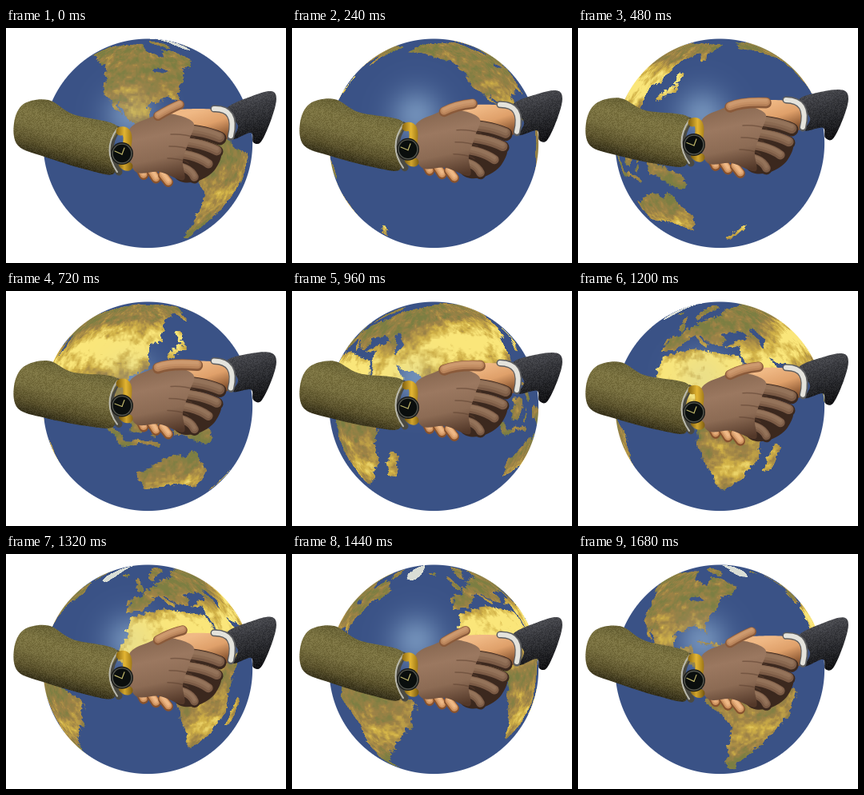
These frames come from a looping animation (350x294 px, 1.8 s). An HTML page with a canvas:

```html
<!DOCTYPE html>
<html lang="en">
<head>
<meta charset="utf-8">
<title>Handshake around the globe</title>
<style>
html, body { margin: 0; width: 100%; height: 100%; overflow: hidden; background: #fff; }
canvas { display: block; }
</style>
</head>
<body>
<canvas id="stage" width="350" height="294"></canvas>
<script>
const STEP = 120, STEPS = 15;
const TW = 720, TH = 360;
const CX = 177.3, CY = 144.3, R = 130.8;
const ctx = document.getElementById('stage').getContext('2d');
const rad = Math.PI / 180;
const clamp = (v, a = 0, b = 1) => Math.min(b, Math.max(a, v));
const mix = (a, b, t) => a + (b - a) * t;
const bell = (v, width) => Math.exp(-((v / width) ** 2));

function makeCanvas(w, h) {
  const c = document.createElement('canvas');
  c.width = w; c.height = h;
  return c.getContext('2d', { willReadFrequently: true });
}

function hash(x, y) {
  const v = Math.sin(x * 127.1 + y * 311.7) * 43758.5453;
  return v - Math.floor(v);
}
function noise(x, y) {
  const i = Math.floor(x), j = Math.floor(y);
  const u = x - i, v = y - j;
  return mix(mix(hash(i, j), hash(i + 1, j), u), mix(hash(i, j + 1), hash(i + 1, j + 1), u), v);
}

// Key points of each coast as longitude, latitude; noise makes them ragged
const continents = {
  northAmerica: [-167,62, -156,71, -95,70, -93,60, -80,53, -77,62, -65,59, -56,51, -70,43, -81,30, -80,25, -84,30,
    -97,27, -95,18, -88,21, -83,10, -79,8, -95,15, -106,21, -113,31, -110,23, -121,35, -124,48, -150,60],
  southAmerica: [-78,9, -61,10, -50,1, -35,-7, -39,-17, -48,-27, -58,-37, -66,-45, -68,-55, -75,-50, -71,-18, -81,-5],
  africa: [-8,35, 10,37, 33,31, 43,12, 51,11, 40,-5, 39,-16, 32,-28, 20,-35, 12,-16, 9,3, -8,5, -17,15],
  europe: [-12,37, -11,44, -2,48, 10,55, 28,60, 40,67, 62,69, 62,42, 45,42, 38,46, 30,45, 25,38, 21,38, 14,45, 6,44, -3,38],
  asia: [58,69, 105,77, 180,69, 162,60, 157,52, 153,60, 137,54, 128,40, 121,39, 121,29, 108,20, 108,10, 101,13,
    104,2, 97,16, 88,22, 78,8, 72,20, 57,26, 50,29, 58,22, 45,13, 35,29, 36,36, 28,37, 40,42, 60,43],
  australia: [110,-23, 127,-15, 134,-17, 138,-13, 149,-27, 145,-38, 133,-33, 112,-34],
};
// Narrow land: width, then the points of a stroke
const strips = [
  [7, 8,60, 16,67, 27,70], [2.5, 10,45, 17,39], [4, -3,51, -5,58], [3, -21,65, -17,65], [3, 131,32, 140,36, 143,44],
  [4, 45,-24, 49,-14], [3.5, 96,5, 105,-6], [2, 106,-7, 122,-9], [7, 112,0, 116,4], [2.5, 121,17, 125,7],
  [6, 131,-2, 146,-8], [2, 120,-4, 122,1], [1.5, -84,22, -70,19], [3, 168,-46, 177,-38], [7, -80,72, -66,66],
];
const lakes = [[4, 49,46, 52,38], [4, 29,43, 40,42.5], [2, -90,46, -82,44]];

// Dryness 0 to 1 picks from olive, brown, gold and pale yellow
const ramp = [[124, 126, 66], [158, 130, 70], [208, 176, 70], [250, 230, 122]];
function landColor(lon, lat, grain) {
  const belt = 24 + 15 * clamp((lon - 45) / 35);
  const dry = bell(Math.abs(lat) - belt, 14) * (lon < -25 ? .3 : lat < 0 ? .5 : .85);
  const v = clamp(dry + .16 + (grain - .5) * 1.1) * 2.999;
  const i = Math.floor(v);
  return ramp[i].map((c, n) => mix(c, ramp[i + 1][n], v - i));
}

function buildEarth() {
  const t = makeCanvas(TW, TH);
  t.setTransform(2, 0, 0, -2, TW / 2, TH / 2);
  t.lineCap = t.lineJoin = 'round';
  const trace = flat => {
    t.beginPath();
    for (let i = 0; i < flat.length; i += 2) t.lineTo(flat[i], flat[i + 1]);
  };
  const strip = ([width, ...flat]) => { trace(flat); t.lineWidth = width; t.stroke(); };
  t.filter = 'blur(0.7px)';
  for (const coast of Object.values(continents)) { trace(coast); t.fill(); }
  strips.forEach(strip);
  t.globalCompositeOperation = 'destination-out';
  lakes.forEach(strip);
  t.globalCompositeOperation = 'source-over';
  t.strokeStyle = '#fff';
  strip([17, -42,68, -38,76]);

  const src = t.getImageData(0, 0, TW, TH).data;
  const out = new Float32Array(TW * TH * 4);
  const ice = [218, 222, 214];
  for (let y = 0, o = 0; y < TH; y++) for (let x = 0; x < TW; x++, o += 4) {
    const broad = noise(x / 13, y / 11), mid = noise(x / 6 + 50, y / 5), fine = noise(x / 2.5, y / 2.5 + 90);
    const sx = clamp(Math.round(x + (mid - .5) * 7 + (fine - .5) * 4), 0, TW - 1);
    const sy = clamp(Math.round(y + (broad - .5) * 5 + (fine - .5) * 4), 0, TH - 1);
    const p = (sy * TW + sx) * 4;
    const color = src[p] > 128 ? ice : landColor(x / 2 - 180, 90 - y / 2, broad * .4 + mid * .35 + fine * .25);
    out.set(color, o);
    out[o + 3] = src[p + 3] / 255;
  }
  return out;
}

// Perspective view of the sphere: texture row and longitude for each pixel
function buildView() {
  const D = 5, f2 = D * D - 1, f = Math.sqrt(f2), tilt = 9 * rad, roll = 4 * rad, view = [];
  for (let y = 12; y < 278; y++) for (let x = 44; x < 310; x++) {
    const dx = x + .5 - CX, dy = CY - y - .5, dist = Math.hypot(dx, dy);
    const cover = clamp(R + .5 - dist);
    if (!cover) continue;
    const k = 1 / Math.max(R, dist + .01);
    const u = (dx * Math.cos(roll) + dy * Math.sin(roll)) * k;
    const v = (dy * Math.cos(roll) - dx * Math.sin(roll)) * k;
    const r2 = u * u + v * v;
    const s = (D * f - Math.sqrt(f2 * (1 - r2))) / (r2 + f2);
    const X = u * s, Y = v * s, Z = D - f * s;
    const lat = Math.asin(Y * Math.cos(tilt) + Z * Math.sin(tilt)) / rad;
    const lon = Math.atan2(X, Z * Math.cos(tilt) - Y * Math.sin(tilt)) / rad;
    const glow = .58 * bell(Math.hypot(x - 155, y - 108), 32);
    view.push({ at: (y * 350 + x) * 4, row: clamp(Math.floor((90 - lat) * 2), 0, TH - 1) * TW, lon, cover, glow });
  }
  return view;
}

const earth = buildEarth(), view = buildView();
const picture = ctx.createImageData(350, 294);
picture.data.fill(255);
const sea = [58, 82, 134], shine = [150, 184, 218];

function drawGlobe(center) {
  for (const { at, row, lon, cover, glow } of view) {
    const p = (row + Math.floor((lon + center + 900) * 2) % TW) * 4;
    const land = earth[p + 3];
    for (let c = 0; c < 3; c++) {
      const lit = mix(mix(sea[c], earth[p + c], land), shine[c], glow * (1 - land * .75));
      picture.data[at + c] = mix(255, lit, cover);
    }
  }
  ctx.putImageData(picture, 0, 0);
}

// The shake lifts everything between the two fixed sleeve ends
let lift = 0;
function sway(x, y) {
  const w = x < 140 ? clamp((x - 15) / 125) ** 1.3 : clamp((338 - x) / 56);
  return [x, y + lift * w];
}
function gradient(x0, y0, x1, y1, ...colors) {
  const g = ctx.createLinearGradient(...sway(x0, y0), ...sway(x1, y1));
  colors.forEach((c, i) => g.addColorStop(i / (colors.length - 1), c));
  return g;
}
function points(flat) {
  const list = [];
  for (let i = 0; i < flat.length; i += 2) list.push(sway(flat[i], flat[i + 1]));
  return list;
}
// Smooth closed curve through the points
function blob(flat, ...fills) {
  const p = points(flat), n = p.length, at = i => p[(i + n) % n];
  ctx.beginPath();
  ctx.moveTo(...p[0]);
  for (let i = 0; i < n; i++) {
    const [a, b, c, d] = [at(i - 1), at(i), at(i + 1), at(i + 2)];
    ctx.bezierCurveTo(b[0] + (c[0] - a[0]) / 6, b[1] + (c[1] - a[1]) / 6,
      c[0] - (d[0] - b[0]) / 6, c[1] - (d[1] - b[1]) / 6, ...c);
  }
  for (const fill of fills) { ctx.fillStyle = fill; ctx.fill(); }
}
function line(flat, width, color) {
  const p = points(flat);
  ctx.beginPath();
  ctx.moveTo(...p[0]);
  if (p.length > 2) ctx.quadraticCurveTo(...p[1], ...p[2]);
  else ctx.lineTo(...p[1]);
  ctx.lineWidth = width;
  ctx.strokeStyle = color;
  ctx.stroke();
}
// Rounded limb, dark below and light above
function finger(flat, width, colors) {
  colors.forEach((color, i) => {
    const raised = flat.map((v, n) => n % 2 ? v - i * width * .08 : v);
    line(raised, width * (1 - i * .24), color);
  });
}

const cloth = makeCanvas(96, 96);
for (let i = 0; i < 96 * 96; i++) {
  cloth.fillStyle = hash(i, 3) < .5 ? '#00000014' : '#ffffff0c';
  cloth.fillRect(i % 96, Math.floor(i / 96), 1, 1);
}
const weave = ctx.createPattern(cloth.canvas, 'repeat');
const brown = ['#3b281e', '#7a5a45', '#8a6951', '#94735a'];
const peach = ['#87522e', '#cf935f', '#e3aa78', '#efb986'];
const tan = ['#8a5a3a', '#b78259', '#c59065', '#cd9a6f'];

function drawRightArm() {
  blob([276,101, 308,85, 331,79, 338,88, 332,113, 319,142, 309,143, 306,131, 284,139, 290,122],
    gradient(300, 84, 314, 142, '#4a4b51', '#34353a', '#212226', '#0d0d10'), weave);
  blob([205,106, 238,101, 268,104, 281,118, 279,137, 255,140, 225,130],
    gradient(245, 101, 258, 140, '#f0b985', '#dfa06a', '#85522e'));
  line([260,101, 290,100, 281,136], 9, '#5c5d5f');
  line([260,101, 289,100, 281,135], 6, '#e4e3dc');
  for (let i = 0; i < 3; i++) finger([168 + 14 * i, 176 + 4 * i, 172 + 15.5 * i, 184 + 4.5 * i], 12, peach);
}

function drawBrownHand() {
  blob([200,150, 264,152, 262,176, 238,192, 212,188], brown[0]);
  for (let i = 3; i >= 0; i--) {
    finger([194, 128 + 15 * i, 240 - 4 * i, 126 + 15 * i, 267 - 3.5 * i * i, 138 + 16.5 * i], 17 - i, brown);
  }
  blob([153,130, 180,112, 204,107, 234,118, 229,140, 221,166, 222,190, 192,180, 160,178],
    gradient(186, 106, 204, 190, '#86664f', '#9b7860', '#8c6b54', '#533829'));
  for (let i = 0; i < 3; i++) line([206 - 2 * i, 133 + 15 * i, 222, 132 + 16 * i, 236 - 4 * i, 137 + 16 * i], 1.5, '#5c402f88');
  const q = clamp(-lift / 14);
  finger([190, 110, 205, mix(101, 104, q), mix(217, 240, q), mix(96, 107, q)], mix(12, 14, q), tan);
}

function drawLeftArm() {
  line([139,127, 120,152, 141,180], 9, '#4b4a42');
  blob([10,119, 22,95, 53,90, 84,108, 138,122, 129,150, 135,182, 100,177, 48,161, 15,147],
    gradient(80, 101, 62, 168, '#6c6535', '#7d743f', '#766d3b', '#5b5229', '#2d2813'), weave);
  line([139,126, 120,152, 139,180], 2, '#b9b8ac');
  line([143,129, 155,126, 151,148], 11, gradient(138, 0, 158, 0, '#8d6a12', '#e3b532', '#9a7415'));
  line([146,170, 150,174, 153,173], 11, gradient(138, 0, 158, 0, '#6d500c', '#d2a52c', '#7a5b10'));

  const [x, y] = sway(145, 157);
  ['#191a18', '#55574f', '#0a0e0d'].forEach((color, i) => {
    ctx.beginPath();
    ctx.arc(x, y, 14 - i * 1.4, 0, 7);
    ctx.fillStyle = color;
    ctx.fill();
  });
  line([145,158, 148,150], 1.2, '#bfb66a');
  line([145,158, 136,154], 1.2, '#bfb66a');
}

function draw() {
  const k = Math.floor(performance.now() / STEP) % STEPS;
  lift = -6 + 7.5 * Math.cos((k + 1.5) / STEPS * 2 * Math.PI);
  drawGlobe(-98 - 360 / STEPS * k);
  ctx.lineCap = ctx.lineJoin = 'round';
  drawRightArm();
  drawBrownHand();
  drawLeftArm();
  requestAnimationFrame(draw);
}
requestAnimationFrame(draw);
</script>
</body>
</html>
```
